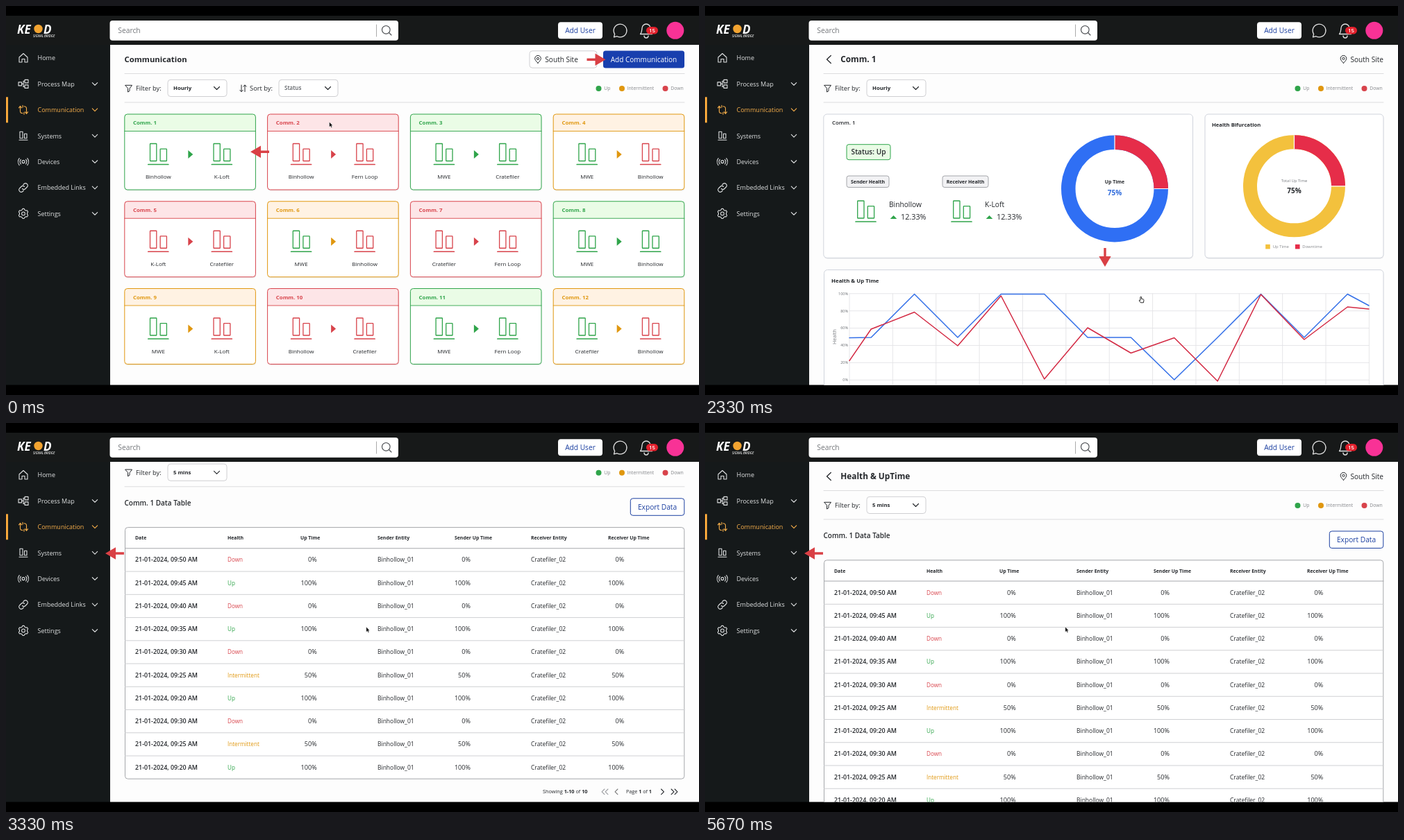
An HTML page for the animation above (6000 ms loop, 998 by 561 pixels).

```html
<!DOCTYPE html>
<html lang="en">
<head>
<meta charset="utf-8">
<title>Communication dashboard</title>
<style>
html, body { margin: 0; width: 100%; height: 100%; overflow: hidden; background: #000; }
svg { display: block; width: 100vw; height: 100vh; }
text { font-family: "Open Sans", "Noto Sans", sans-serif; }
</style>
</head>
<body>
<svg id="stage" viewBox="0 0 998 561"></svg>
<script>
const INK = '#24272b', LINE = '#dcdcde', ALERT = '#d94045', BLUE = '#1b3fa0';
const STATUS = {
  U: { color: '#2fa44a', tint: '#eafce6', name: 'Up', pct: '100%' },
  I: { color: '#e0970f', tint: '#fff2e3', name: 'Intermittent', pct: '50%' },
  D: { color: '#d8434b', tint: '#fde5e7', name: 'Down', pct: '0%' }
};

// ---- drawing helpers ----
const text = (x, y, s, size, fill = INK, weight = 400, anchor = 'start') =>
  `<text x="${x}" y="${y}" font-size="${size}" fill="${fill}" font-weight="${weight}" text-anchor="${anchor}">${s}</text>`;
const rect = (x, y, w, h, fill, stroke = 'none', r = 0, sw = 1) =>
  `<rect x="${x}" y="${y}" width="${w}" height="${h}" rx="${r}" fill="${fill}" stroke="${stroke}" stroke-width="${sw}"/>`;
const circle = (x, y, r, fill, stroke = 'none', sw = 1) =>
  `<circle cx="${x}" cy="${y}" r="${r}" fill="${fill}" stroke="${stroke}" stroke-width="${sw}"/>`;
const line = (d, stroke, sw = 1) =>
  `<path d="${d}" fill="none" stroke="${stroke}" stroke-width="${sw}" stroke-linecap="round" stroke-linejoin="round"/>`;
const shape = (d, fill) => `<path d="${d}" fill="${fill}"/>`;
const at = (x, y, body, turn = 0) => `<g transform="translate(${x} ${y}) rotate(${turn})">${body}</g>`;
const rule = y => line(`M171 ${y}H977`, LINE);
const chevron = (x, y, color, w = 4, turn = 0) => at(x, y, line(`M${-w} ${-w / 2}L0 ${w / 2}L${w} ${-w / 2}`, color, 1.1), turn);

// Pointer arrow with its tip at the origin, aimed left
const redArrow = (x, y, turn) => at(x, y, shape('M0 0L15 -8.7V-1.7H27V1.7H15V8.7Z', ALERT), turn);

const bars = (x, y, color) => at(x, y,
  rect(-11.8, -30, 9.3, 25, 'none', color, 0.6, 1.3) +
  rect(2.8, -22.3, 9.3, 17.3, 'none', color, 0.6, 1.3) +
  line('M-14.5 0H14.5', color, 1.7));

const pin = (x, y) => at(x, y,
  line('M0 5.3C-2.5 2.5 -4.3 .8 -4.3 -1.3A4.3 4.3 0 0 1 4.3 -1.3C4.3 .8 2.5 2.5 0 5.3Z', INK, 1) +
  circle(0, -1.2, 1.6, 'none', INK));

const dropdown = (x, label, color = INK, weight = 700, size = 7.75) =>
  rect(x, 106.3, 85, 24.2, '#fff', '#cfcfd2', 4) + text(x + 8, 121.3, label, size, color, weight) + chevron(x + 70.5, 118.5, INK);

function filterBar(label) {
  const legend = [[853.5, 'U'], [887, 'I'], [949.5, 'D']].map(([x, k]) =>
    circle(x, 119, 4, STATUS[k].color) + text(x + 7.7, 121.4, STATUS[k].name, 6.85, '#85878b')).join('');
  return line('M172 114.3H181.5L178 119V122.5L175.5 124V119Z', INK) +
    text(187, 121.8, 'Filter by:', 9.25) + dropdown(233, label) + legend + rule(139);
}

const pageHead = title => line('M181.3 71.5L175.5 77L181.3 82.5', INK, 1.3) +
  text(195.3, 81, title, 11.8, INK, 700) + pin(919.5, 77) +
  text(977, 80.6, 'South Site', 10.1, INK, 400, 'end') + rule(97.5);

// ---- fixed frame ----
function gear() {
  let d = '';
  for (let i = 0; i < 72; i++) {
    const a = i * Math.PI / 36, r = 6.3 + 0.75 * Math.tanh(3 * Math.cos(6 * a));
    d += `${i ? 'L' : 'M'}${(r * Math.sin(a)).toFixed(2)} ${(r * Math.cos(a)).toFixed(2)}`;
  }
  return d + 'Z';
}

const ICONS = [
  'M-6 -1L0 -6.5L6 -1V6H2V1.5H-2V6H-6Z',
  'M-7 -2.5H-2.5V2.5H-7ZM2 -6H7V-1.5H2ZM2 1.5H7V6H2ZM-2.5 0H0M2 -4H0V4H2',
  'M-6.5 -3L-4.5 -5.5L-2.5 -3M-4.5 -5.5V2Q-4.5 5 -1 5M6.5 3L4.5 5.5L2.5 3M4.5 5.5V-2Q4.5 -5 1 -5M-1 -6.5V-3.5M1 3.5V6.5',
  'M-5 -6H-1V3.5H-5ZM1.5 -3H5V3.5H1.5ZM-6 6H6',
  'M-2 0A2 2 0 1 0 2 0A2 2 0 1 0 -2 0M-3.6 -3.2A5 5 0 0 0 -3.6 3.2M3.6 -3.2A5 5 0 0 1 3.6 3.2M-5.8 -5A8 8 0 0 0 -5.8 5M5.8 -5A8 8 0 0 1 5.8 5',
  'M-1.5 1.5A3.2 3.2 0 0 0 3 1.5L5.5 -1A3.2 3.2 0 0 0 1 -5.5L-.3 -4.2M1.5 -1.5A3.2 3.2 0 0 0 -3 -1.5L-5.5 1A3.2 3.2 0 0 0 -1 5.5L.3 4.2',
  gear() + 'M-2.4 0A2.4 2.4 0 1 0 2.4 0A2.4 2.4 0 1 0 -2.4 0'
];
const MENU = ['Home', 'Process Map', 'Communication', 'Systems', 'Devices', 'Embedded Links', 'Settings'];

function chrome() {
  const menu = MENU.map((label, i) => {
    const y = 75 + 37.4 * i, color = i === 2 ? '#f6ae4a' : '#dfe1e2';
    return at(25, y, line(ICONS[i], color, 1.1)) + text(45.5, y + 3.4, label, 9, color) +
      (i ? chevron(128, y, color, 3.7) : '');
  }).join('');
  const logo = '<g font-style="italic">' + text(16, 40, 'KE', 17, '#fff', 700) + text(54, 40, 'D', 17, '#fff', 700) +
    text(39, 44.5, 'SIGNAL BRIDGE', 4.5, '#e4e4e4', 600) + '</g>' + circle(46.5, 33, 6.2, '#f2a330');
  return rect(0, 14, 998, 42, '#171919') + rect(0, 56, 150, 490.5, '#15191a') + logo +
    rect(149.5, 21, 415.5, 28.8, '#fff', 'none', 4) + text(161.3, 39, 'Search', 10.3, '#73767a') +
    line('M533.5 27V44', '#aaa') + circle(547.3, 34.3, 5.8, 'none', '#45484c', 1.1) + line('M551.5 38.5L555 42', '#45484c', 1.1) +
    rect(795, 23.2, 64, 24, '#fff', 'none', 4) + text(827, 39, 'Add User', 10.2, BLUE, 500, 'middle') +
    line('M875.5 44.8L876.6 40.5A9.4 9.4 0 1 1 880 43.7Z', '#e3e3e3', 1.3) +
    line('M913.5 40.5C916 38 915.5 35 916 32A6 6 0 0 1 928 32C928.5 35 928 38 930.5 40.5ZM919 43A3 3 0 0 0 925 43', '#e3e3e3', 1.3) +
    rect(922, 30, 17, 10.5, '#e3202c', 'none', 5.2) + text(930.5, 38, '15', 7.8, '#fff', 600, 'middle') +
    circle(963.8, 35.3, 12.5, '#f83296') + rect(0, 131.3, 3, 37, '#f5a63b') + menu;
}

// ---- pages ----
const [BIN, LOFT, FERN, MWE, CRATE] = ['Binhollow', 'K-Loft', 'Fern Loop', 'MWE', 'Cratefiler'];
const LINKS = [
  ['U', BIN, LOFT], ['D', BIN, FERN], ['U', MWE, CRATE], ['I', MWE, BIN],
  ['D', LOFT, CRATE], ['I', MWE, BIN], ['D', CRATE, FERN], ['U', MWE, BIN],
  ['I', MWE, LOFT], ['D', BIN, CRATE], ['U', MWE, FERN], ['I', CRATE, BIN]
];

function card([key, from, to], i) {
  const { color, tint } = STATUS[key];
  const [a, b] = (key === 'I' ? ['U', 'D'] : [key, key]).map(k => STATUS[k].color);
  return at(170.8 + 205.8 * (i % 4), 156 + 125.75 * Math.floor(i / 4),
    rect(0.5, 1.5, 188.5, 109, '#e9e9ea', 'none', 4) +
    rect(0, 0, 188.6, 109, '#fff', 'none', 4) +
    shape('M0 24.5V4Q0 0 4 0H184.6Q188.6 0 188.6 4V24.5Z', tint) +
    line('M0 24.5H188.6', color, 0.9) + rect(0, 0, 188.6, 109, 'none', color, 4) +
    text(12.2, 15.2, `Comm. ${i + 1}`, 7.85, color, 700) +
    bars(48.5, 72.5, a) + bars(140, 72.5, b) + shape('M91.5 52L98.5 58L91.5 64Z', color) +
    text(48.5, 93.2, from, 8, INK, 400, 'middle') + text(140, 93.2, to, 8, INK, 400, 'middle'));
}

function listPage() {
  return text(170.5, 81, 'Communication', 11.3, INK, 700) +
    rect(754, 64.8, 97, 24.4, '#fff', '#cfcfd2', 4) + pin(766, 77) + text(776.3, 80.6, 'South Site', 10.1) +
    rect(860, 64.5, 117, 25, '#183fae', 'none', 3.5) + text(918.5, 80.6, 'Add Communication', 10, '#fff', 500, 'middle') +
    rule(97.5) + filterBar('Hourly') +
    line('M339 114V123.5M336.8 121.3L339 123.5L341.2 121.3M344 123.5V114M341.8 116.2L344 114L346.2 116.2', INK) +
    text(351, 121.8, 'Sort by:', 9.35) + dropdown(393, 'Status', '#5d6065', 600, 8) +
    LINKS.map(card).join('') + redArrow(863.5, 77.3, 180) + redArrow(352, 210.3, 0);
}

function donut(x, y, outer, inner, main) {
  const r = (outer + inner) / 2, w = outer - inner;
  return at(x, y, circle(0, 0, r, 'none', main, w) +
    `<path d="M0 ${-r}A${r} ${r} 0 0 1 ${r} 0" fill="none" stroke="#e62d49" stroke-width="${w}"/>` +
    `<path d="M0 ${-inner}V${-outer}M${inner} 0H${outer}" stroke="#fff" stroke-width="1.2"/>`);
}

function chart() {
  let out = '';
  for (let i = 0; i < 6; i++) {
    const y = 539.3 - 24.9 * i;
    out += line(`M208 ${y}H956.5`, '#e4e4e7', 0.9) + text(206, y + 1.8, `${20 * i}%`, 5.5, '#6c6f74', 400, 'end');
  }
  for (let i = 0; i < 13; i++) out += line(`M${208 + 62.37 * i} 414.8V546`, '#e4e4e7', 0.9);
  const series = (ys, color) => line('M' + ys.map((y, i) =>
    `${Math.min(956, i ? 239.2 + 62.37 * (i - 1) : 208)} ${y}`).join('L'), color, 1.5);
  return out +
    series([478.5, 478, 415.5, 478, 415.5, 415.5, 478, 478, 539, 478, 415.5, 478, 415.5, 432], '#3470e8') +
    series([511.5, 466, 441.5, 490, 418, 538, 464, 500.5, 478.5, 541, 416, 481, 434, 437], '#d32943') +
    at(189, 477, text(0, 0, 'Health', 7.1, '#777a7f', 400, 'middle'), -90);
}

function detailPage() {
  const panel = (x, y, w, h) => rect(x + 0.5, y + 1.5, w, h, '#ececee', 'none', 5) + rect(x, y, w, h, '#fff', '#d0d4dc', 5);
  const up = STATUS.U;
  const entity = (x, w, title, name) => rect(x, 245, w, 16.5, '#f2f2f4', '#a4a6aa', 3) +
    text(x + w / 2, 255.7, title, 6.9, INK, 700, 'middle') + bars(x + 27.5, 311, up.color) +
    text(x + 61, 290, name, 10.2) + shape(`M${x + 62.7} 307L${x + 67.5} 302L${x + 72.3} 307Z`, up.color) +
    text(x + 78, 308.2, '12.33%', 10.8);
  return pageHead('Comm. 1') + filterBar('Hourly') +
    panel(170.8, 156, 531.7, 207.3) + panel(720, 156, 257, 207.3) + panel(171.5, 380.5, 805.5, 200) +
    text(183, 171.2, 'Comm. 1', 7.85, INK, 600) +
    rect(204, 199.7, 63, 22, up.tint, up.color, 3) + text(235.5, 214.4, 'Status: Up', 10.1, INK, 600, 'middle') +
    entity(204, 61, 'Sender Health', BIN) + entity(342, 66, 'Receiver Health', LOFT) +
    donut(590, 263.5, 77, 56.5, '#2f6ff4') +
    text(590, 255.6, 'Up Time', 6.9, INK, 700, 'middle') + text(590, 273, '75%', 10, '#2f6bdc', 700, 'middle') +
    text(730, 174.4, 'Health Bifurcation', 7.65, INK, 700) + donut(848.5, 259.8, 73.5, 53.5, '#f3c13d') +
    text(848.5, 253.5, 'Total Up Time', 5.9, '#777a7f', 400, 'middle') + text(848.5, 269.7, '75%', 10, INK, 700, 'middle') +
    rect(807.2, 343.8, 6.6, 6.6, '#f3c13d') + text(817.7, 349.2, 'Up Time', 5.95, '#85878b') +
    rect(850, 343.8, 6.6, 6.6, '#e62d49') + text(860.3, 349.2, 'Downtime', 5.95, '#85878b') +
    text(182, 399, 'Health &amp; Up Time', 7.85, INK, 700) + chart() + redArrow(576, 376, -90);
}

function tablePage() {
  const heads = [[186, 'Date'], [319, 'Health'], [424, 'Up Time'], [535, 'Sender Entity'],
    [646, 'Sender Up Time'], [756, 'Receiver Entity'], [867, 'Receiver Up Time']];
  const minutes = [50, 45, 40, 35, 30, 25, 20, 30, 25, 20];
  const rows = [...'DUDUDIUDIU'].map((key, i) => {
    const { name, color, pct } = STATUS[key], y = 247.6 + 33.24 * i;
    return text(186, y, `21-01-2024, 09:${minutes[i]} AM`, 8.9, INK, 600) + text(319, y, name, 8.15, color) +
      [447.7, 669, 890.3].map(x => text(x, y, pct, 9.1, INK, 400, 'end')).join('') +
      text(535, y, BIN + '_01', 8.5) + text(756, y, CRATE + '_02', 8.5) +
      (i < 9 ? line(`M171.5 ${261.3 + 33.24 * i}H977`, '#cfd0d3') : '');
  }).join('');
  const pager = [[860, 90, '#9a9ca0'], [865, 90, '#9a9ca0'], [879, 90, '#777'], [945.5, -90, INK], [960, -90, INK], [965, -90, INK]]
    .map(([x, turn, color]) => chevron(x, 579, color, 3.8, turn)).join('');
  return pageHead('Health &amp; UpTime') + filterBar('5 mins') +
    text(170.5, 166.4, 'Comm. 1 Data Table', 10, INK, 600) +
    rect(899.3, 156, 77.5, 24.5, '#fff', BLUE, 3.5) + text(938, 172, 'Export Data', 10.2, BLUE, 500, 'middle') +
    rect(171.5, 197.8, 805.3, 362.6, '#fff', '#a5a7ab', 4) + line('M171.5 228H977', '#a5a7ab') +
    heads.map(([x, s]) => text(x, 215.6, s, 6.9, INK, 700)).join('') + rows +
    text(773, 581.6, 'Showing <tspan font-weight="700">1-10</tspan> of <tspan font-weight="700">10</tspan>', 7.3) +
    text(893, 581.6, 'Page <tspan font-weight="700">1</tspan> of <tspan font-weight="700">1</tspan>', 7.2) + pager;
}

// ---- scene ----
const byId = id => document.getElementById(id);
byId('stage').innerHTML =
  '<clipPath id="view"><rect x="150" y="56" width="848" height="490.5"/></clipPath>' +
  rect(0, 0, 998, 561, '#000') + rect(150, 56, 848, 490.5, '#fdfdfd') + chrome() +
  `<g clip-path="url(#view)"><g id="list">${listPage()}</g><g id="detail">${detailPage()}</g><g id="table">${tablePage()}</g></g>` +
  `<g id="hint">${redArrow(143, 188, 0)}</g>` +
  '<g id="cursor">' +
  '<path id="arrow" d="M0 0V7.4L1.7 5.9L2.9 8.4L4.1 7.8L3 5.4H5Z" fill="#000" stroke="#fff" stroke-width=".5"/>' +
  '<path id="hand" d="M-1.7 1V-3.8Q-.9 -5 0 -3.8V-1.2L2.6 -.6Q3.6 -.2 3.4 1L2.8 4.3H-1.2L-3.4 1.4Q-3.4 .2 -1.7 1Z" fill="#fff" stroke="#111" stroke-width=".9"/></g>';

const LOOP = 6000;
// start, x, y, cursor kind
const CURSOR = [
  [0, 465.6, 167.2, 'arrow'], [670, 308, 235, 'hand'], [1000, 319.6, 225, 'arrow'],
  [1670, 628.6, 423.5, 'hand'], [2670, 571, 363.8, 'arrow'], [3000, 518.8, 294, 'arrow']
];
const show = (id, on) => byId(id).setAttribute('visibility', on ? 'visible' : 'hidden');

function render(t) {
  const page = t < 1000 ? 'list' : t < 2670 ? 'detail' : 'table';
  ['list', 'detail', 'table'].forEach(id => show(id, id === page));
  show('hint', page === 'table');
  const scroll = t >= 3330 && t < 3670 ? 47.2 : 0;
  byId('table').setAttribute('transform', `translate(0 ${-scroll})`);
  const [, x, y, kind] = CURSOR.filter(k => k[0] <= t).pop();
  byId('cursor').setAttribute('transform', `translate(${x} ${y})`);
  show('arrow', kind === 'arrow');
  show('hand', kind === 'hand');
}

const start = performance.now();
function tick() {
  render((performance.now() - start) % LOOP);
  requestAnimationFrame(tick);
}
tick();
</script>
</body>
</html>
```
